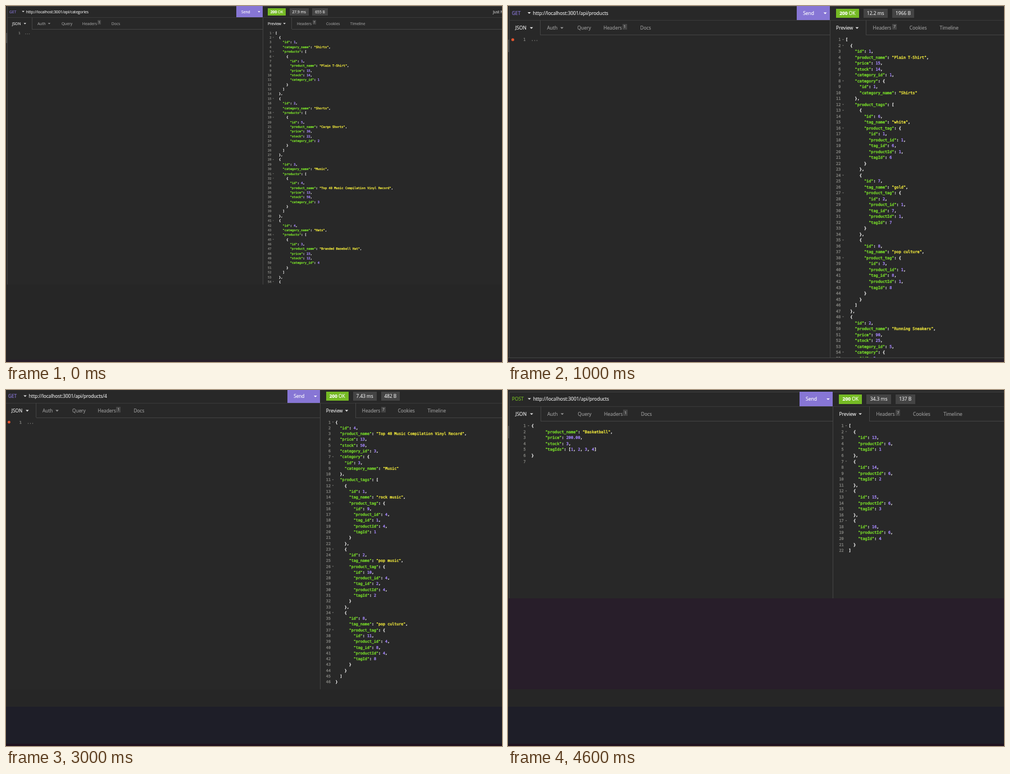
These frames come from a looping animation (883x634 px, 5000 ms). An HTML page with a canvas:

```html
<!DOCTYPE html>
<html lang="en">
<head>
<meta charset="utf-8">
<title>API requests</title>
<style>
  html, body { margin: 0; width: 100%; height: 100%; overflow: hidden; background: #282828; }
  canvas { display: block; }
</style>
</head>
<body>
<canvas id="stage" width="883" height="634"></canvas>
<script>
const ctx = document.getElementById('stage').getContext('2d');
const W = 883, H = 634, HOLD = 1000;
const UI = '"Open Sans", "Noto Sans", sans-serif';
const MONO = '"DejaVu Sans Mono", "Noto Sans Mono", monospace';
const COLOR = {
  panel: '#282828', below: '#262626', navy: '#1e1e28', plum: '#281e2a', strip: '#20121f',
  line: '#444', text: '#e8e8e8', dim: '#999', gutter: '#7c7c78', punct: '#f6f6f6',
  key: '#7ae02a', string: '#f0e83c', number: '#a486fa',
  green: '#75ba24', purple: '#8776d5', badge: '#444', red: '#e8562f'
};

// Shop data
const categories = ['', 'Shirts', 'Shorts', 'Music', 'Hats', 'Shoes'];
const tags = { 1: 'rock music', 2: 'pop music', 6: 'white', 7: 'gold', 8: 'pop culture' };
const products = [
  [],
  ['Plain T-Shirt', 15, 14, 1],
  ['Running Sneakers', 90, 25, 5],
  ['Branded Baseball Hat', 23, 12, 4],
  ['Top 40 Music Compilation Vinyl Record', 13, 50, 3],
  ['Cargo Shorts', 30, 22, 2]
];

function product(id) {
  const [product_name, price, stock, category_id] = products[id];
  return { id, product_name, price, stock, category_id };
}
const category = id => ({ id, category_name: categories[id] });
const link = (id, product_id, tag_id) =>
  ({ id, product_id, tag_id, productId: product_id, tagId: tag_id });

// links: [link id, tag id] pairs
function fullProduct(id, links) {
  const item = product(id);
  return {
    ...item,
    category: category(item.category_id),
    product_tags: links.map(([n, tag]) =>
      ({ id: tag, tag_name: tags[tag], product_tag: link(n, id, tag) }))
  };
}
// links: [link id, product id] pairs
const fullTag = (id, links) => ({
  id, tag_name: tags[id],
  product_tags: links.map(([n, item]) => ({ ...product(item), product_tag: link(n, item, id) }))
});
const toLines = data => JSON.stringify(data, null, 2).split('\n');

// s: scale, x: left edge, split: pane divider, y: header centre, end: panel bottom
const scenes = [
  {
    s: .543, x: 2.5, split: 457.5, y: 10.4, end: 496, sidebar: true,
    method: 'GET', path: 'categories', stats: ['27.9 ms', '655 B'], age: 867,
    below: [[496, COLOR.below], [630, COLOR.plum]],
    reply: toLines([1, 5, 4, 3, 2].map((item, i) =>
      ({ ...category(i + 1), products: [product(item)] })))
  },
  {
    s: .682, x: 2.5, split: 573.5, y: 13, end: 626, edge: true, dot: true, sidebar: true,
    method: 'GET', path: 'products', stats: ['12.2 ms', '1966 B'],
    below: [[626, COLOR.below], [630, COLOR.plum]],
    reply: toLines([fullProduct(1, [[1, 6], [2, 7], [3, 8]]), fullProduct(2, [[4, 6]])])
  },
  {
    s: .611, x: -1, split: 510.5, y: 13.2, end: 563, edge: true, dot: true,
    method: 'GET', path: 'tags', stats: ['13.5 ms', '2.2 KB'],
    below: [[563, COLOR.navy], [630, COLOR.strip]],
    reply: toLines([fullTag(1, [[5, 3], [9, 4]]), fullTag(2, [[10, 4]]), fullTag(6, [])])
  },
  {
    s: .6675, x: -.5, split: 559.5, y: 11.3, end: 533, dot: true,
    method: 'GET', path: 'products/4', stats: ['7.43 ms', '482 B'],
    below: [[533, COLOR.below], [564, COLOR.navy], [630, COLOR.strip]],
    reply: toLines(fullProduct(4, [[9, 1], [10, 2], [11, 8]]))
  },
  {
    s: .6865, x: 2.5, split: 578.8, y: 16.4, end: 371, sidebar: true,
    method: 'POST', path: 'products', stats: ['34.3 ms', '137 B'],
    below: [[371, COLOR.plum], [533, COLOR.below], [564, COLOR.navy], [630, COLOR.strip]],
    body: ['{', '      "product_name": "Basketball",', '      "price": 200.00,',
      '      "stock": 3,', '      "tagIds": [1, 2, 3, 4]', '}', ''],
    reply: toLines([1, 2, 3, 4].map(n => ({ id: 12 + n, productId: 6, tagId: n })))
  }
];

// Edges snap to whole pixels
function rect(x, y, w, h, color) {
  const left = Math.round(x), top = Math.round(y);
  ctx.fillStyle = color;
  ctx.fillRect(left, top, Math.round(x + w) - left, Math.round(y + h) - top);
}
const hLine = (x0, x1, y, color = COLOR.line) => rect(x0, Math.floor(y), x1 - x0, 1, color);
const vLine = (x, y0, y1) => rect(Math.floor(x), y0, 1, y1 - y0, COLOR.line);

// y is the middle of the capitals; returns the advance width
function write(str, x, y, size, color, { font = UI, weight = 400, align = 'left' } = {}) {
  const baseline = y + size * .36;
  ctx.font = `${weight} ${size}px ${font}`;
  ctx.textAlign = align;
  ctx.fillStyle = ctx.strokeStyle = color;
  ctx.fillText(str, x, baseline);
  // A hairline keeps tiny letters solid
  ctx.lineWidth = size * (font === MONO ? .055 : .02);
  ctx.strokeText(str, x, baseline);
  return ctx.measureText(str).width;
}

function triangle(x, y, r, color) {
  ctx.fillStyle = color;
  ctx.beginPath();
  ctx.moveTo(x - r, y - r / 2);
  ctx.lineTo(x + r, y - r / 2);
  ctx.lineTo(x, y + r / 2);
  ctx.fill();
}

function tokenColor(token) {
  if (token.endsWith(':')) return COLOR.key;
  if (token[0] === '"') return COLOR.string;
  return /\d/.test(token) ? COLOR.number : COLOR.punct;
}

function drawCode(lines, x, numberX, foldX, y, s) {
  const size = 10.03 * s, mono = { font: MONO };
  ctx.font = `${size}px ${MONO}`;
  const step = ctx.measureText('0').width;
  lines.forEach((line, i) => {
    const ly = y + i * 15.4 * s;
    write(i + 1, numberX, ly, size, COLOR.gutter, { font: MONO, align: 'right' });
    if (/[{[]$/.test(line)) triangle(foldX, ly, 2.2 * s, COLOR.gutter);
    for (const { 0: token, index } of line.matchAll(/"[^"]*":?|[\d.]+|[^\s"\d]/g)) {
      const isKey = token.endsWith(':');
      const tx = x + index * step;
      write(isKey ? token.slice(0, -1) : token, tx, ly, size,
        line === '...' ? COLOR.gutter : tokenColor(token), mono);
      if (isKey) write(':', tx + (token.length - 1) * step, ly, size, COLOR.punct, mono);
    }
  });
}

function drawTabs(x, y, s, size, tabs, count, countX) {
  for (const [label, left, arrow] of tabs) {
    const color = label === tabs[0][0] ? COLOR.text : COLOR.dim;
    write(label, x + left * s, y, size, color);
    if (arrow) triangle(x + arrow * s, y, 4.2 * s, color);
  }
  const cx = x + countX * s, cy = y - 3.5 * s;
  rect(cx - 6 * s, cy - 7.5 * s, 12 * s, 15 * s, COLOR.badge);
  write(count, cx, cy, size * .8, '#bbb', { align: 'center' });
}

function drawStats({ s, split, y, stats }, size) {
  const pad = 9 * s, h = 24 * s;
  let x = split + 15.4 * s;
  const box = (w, color) => rect(x, y - h / 2, w + 2 * pad, h, color);
  ctx.font = `700 ${size}px ${UI}`;
  const codeW = ctx.measureText('200 ').width;
  ctx.font = `400 ${size}px ${UI}`;
  const okW = ctx.measureText('OK').width;
  box(codeW + okW, COLOR.green);
  write('200 ', x + pad, y, size, '#fff', { weight: 700 });
  write('OK', x + pad + codeW, y, size, '#fff');
  x += codeW + okW + 2 * pad + 12 * s;
  for (const label of stats) {
    ctx.font = `400 ${size}px ${UI}`;
    box(ctx.measureText(label).width, COLOR.badge);
    x += write(label, x + pad, y, size, COLOR.text) + 2 * pad + 12 * s;
  }
}

function draw(scene) {
  const { s, x, split, y, end } = scene;
  const size = 12.35 * s;
  const top = y - 19 * s, headEnd = Math.floor(y + 18.4 * s), tabEnd = y + 57 * s;
  const tabY = y + 38.5 * s, codeY = y + 68.8 * s;

  rect(0, 0, W, H, COLOR.panel);
  ctx.save();
  ctx.beginPath();
  ctx.rect(0, 0, W, end);
  ctx.clip();

  // Frame lines
  if (top >= 0) hLine(Math.max(x, 0), W, top);
  hLine(Math.max(x, 0), W, headEnd, '#3a3a3a');
  if (x > 0) vLine(x, Math.max(top, 0), end);
  if (scene.sidebar) rect(0, codeY, 2, 33 * s, '#484848');
  vLine(split, headEnd, end);
  vLine(x + 81 * s, headEnd, tabEnd);
  vLine(split + 94 * s, headEnd, tabEnd);
  hLine(x + 81 * s, split, tabEnd);
  hLine(split + 94 * s, W, tabEnd);

  // Request bar
  write(scene.method, x + 6.6 * s, y, size, scene.method === 'GET' ? COLOR.purple : COLOR.green);
  triangle(x + 51.7 * s, y - .5, 4.2 * s, COLOR.text);
  write('http://localhost:3001/api/' + scene.path, x + 61.4 * s, y, size, COLOR.text);
  const sendX = split - 87 * s;
  rect(sendX, top, Math.floor(split) - sendX, headEnd - top, COLOR.purple);
  write('Send', split - 56.5 * s, y, size, '#fff', { align: 'center' });
  triangle(split - 13 * s, y, 4.2 * s, '#fff');
  drawStats(scene, size);
  if (scene.age) write('Just Now', scene.age, y, size, '#ccc');

  drawTabs(x, tabY, s, size,
    [['JSON', 15.5, 57.5], ['Auth', 98.3, 137], ['Query', 177.5], ['Headers', 245.5], ['Docs', 341.3]],
    '1', 301);
  drawTabs(split, tabY, s, size,
    [['Preview', 15.5, 70.3], ['Headers', 111.4], ['Cookies', 207], ['Timeline', 286]],
    '7', 168.3);

  drawCode(scene.body || ['...'], x + 57 * s, x + 42.3 * s, x + 49.5 * s, codeY, s);
  drawCode(scene.reply, split + 40.5 * s, split + 27.6 * s, split + 33.7 * s, codeY, s);
  if (scene.dot) {
    ctx.fillStyle = COLOR.red;
    ctx.beginPath();
    ctx.arc(x + 8.8 * s, codeY, 3.7 * s, 0, 2 * Math.PI);
    ctx.fill();
  }
  ctx.restore();

  for (const [from, color] of scene.below) rect(0, from, W, H - from, color);
  if (scene.edge) hLine(0, W, end);
}

let shown = -1;
function tick() {
  const index = Math.floor(performance.now() / HOLD) % scenes.length;
  if (index !== shown) draw(scenes[shown = index]);
  requestAnimationFrame(tick);
}
tick();
</script>
</body>
</html>
```
